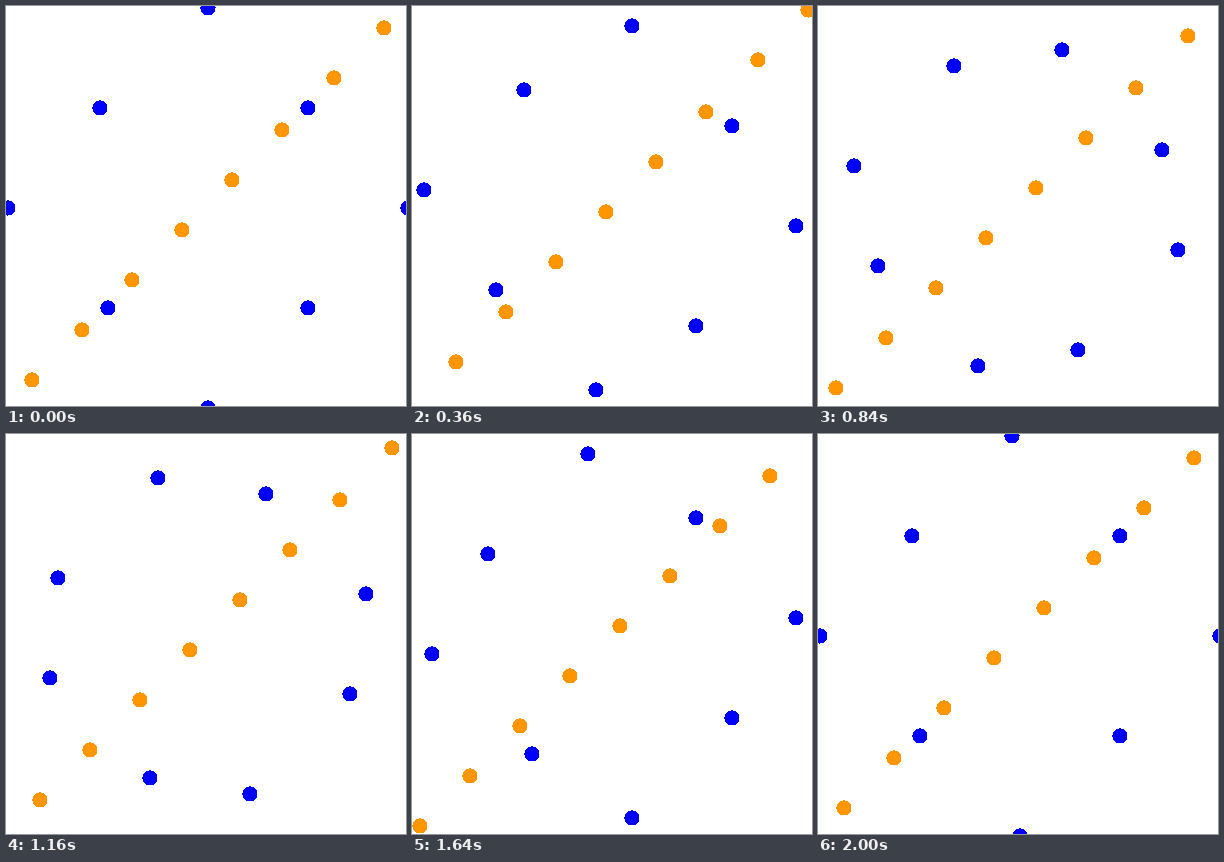
An HTML page that plays this animation: 400 by 400 pixels, repeating every 2.04 s.

```html
<!DOCTYPE html>
<html>
<head>
<meta charset="utf-8">
<style>
html, body { margin: 0; width: 100%; height: 100%; overflow: hidden; background: #fff; }
svg { display: block; shape-rendering: crispEdges; }
</style>
</head>
<body>
<svg id="stage" width="400" height="400"></svg>
<script>
const STEP_MS = 40, STEPS = 51, SPEED = 2, COUNT = 8, RADIUS = 7.6;
const stage = document.getElementById('stage');

function makeDots(color) {
  return Array.from({ length: COUNT }, () => {
    const dot = document.createElementNS('http://www.w3.org/2000/svg', 'circle');
    dot.setAttribute('r', RADIUS);
    dot.setAttribute('fill', color);
    return stage.appendChild(dot);
  });
}

function place(dot, x, y) {
  dot.setAttribute('cx', x);
  dot.setAttribute('cy', y);
}

const bouncers = makeDots('#00f');
const climbers = makeDots('#ff9600');

function draw(now) {
  const shift = SPEED * (Math.floor(now / STEP_MS) % STEPS);

  // All follow one diamond path, bouncing at x = 402, y = 402 and x = -2
  bouncers.forEach((dot, i) => {
    const p = 100 * i + shift;
    place(dot, Math.abs(404 - Math.abs(p - 200)) - 2, 402 - Math.abs(p - 400));
  });

  // Rise along the diagonal and wrap around
  climbers.forEach((dot, i) => {
    const x = (328 + 50 * i + shift) % 402;
    place(dot, x, 400 - x);
  });
}

function tick() {
  draw(performance.now());
  requestAnimationFrame(tick);
}
tick();
</script>
</body>
</html>
```
